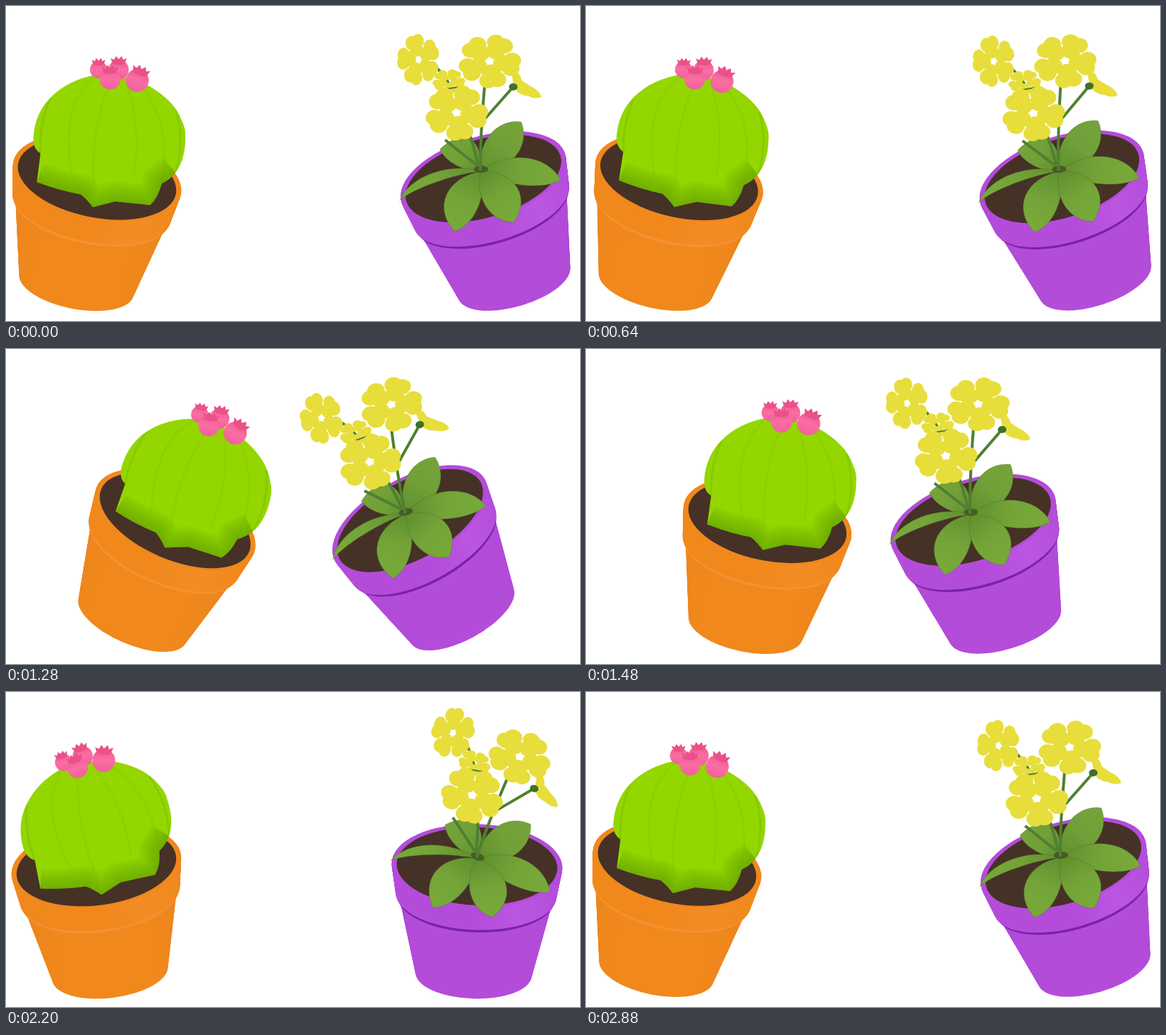
An HTML page with a canvas that plays this animation: 800x440 px, repeating every 5.76 s.

```html
<!DOCTYPE html>
<html lang="en">
<head>
<meta charset="utf-8">
<title>Two potted plants</title>
<style>
html, body { margin: 0; width: 100%; height: 100%; overflow: hidden; background: #fff; }
canvas { display: block; }
</style>
</head>
<body>
<canvas id="stage" width="800" height="440"></canvas>
<script>
const ctx = document.getElementById('stage').getContext('2d');
const LOOP = 5760, STEP = 40;
const HIT = 1400, REACH = 172, LEAN_IN = 16, LEAN_BACK = 22;
const YELLOW = '#e7de3c', STEM = '#4f8030';
const RAD = Math.PI / 180;

function blend(g, colors) {
  colors.forEach((c, i) => g.addColorStop(i / (colors.length - 1), c));
  return g;
}
const linear = (x0, y0, x1, y1, ...colors) => blend(ctx.createLinearGradient(x0, y0, x1, y1), colors);

function oval(x, y, rx, ry, color) {
  ctx.beginPath();
  ctx.ellipse(x, y, rx, ry, 0, 0, 7);
  if (color) ctx.fillStyle = color;
  ctx.fill();
}

function fill(path, color) {
  ctx.fillStyle = color;
  ctx.fill(new Path2D(path));
}

function line(path, color, width) {
  ctx.strokeStyle = color;
  ctx.lineWidth = width;
  ctx.stroke(new Path2D(path));
}

// Draws fn with its own origin, turn and scale.
function at(x, y, turn, scale, fn) {
  ctx.save();
  ctx.translate(x, y);
  ctx.rotate(turn);
  ctx.scale(scale, scale);
  fn();
  ctx.restore();
}

// Fills the solid between two ovals given as [y, rx, ry].
function sweep(a, b, color) {
  ctx.fillStyle = color;
  for (let i = 0; i <= 50; i++) {
    const [y, rx, ry] = a.map((v, k) => v + (b[k] - v) * i / 50);
    oval(0, y, rx, ry);
  }
}

function pot(edge, main, light, seam) {
  sweep([38, 108, 48], [149, 81, 34], linear(-108, 0, 108, 0, edge, main, main, main, main, edge));
  oval(0, 41.5, 110, 49, seam);
  sweep([-2, 119, 57], [38, 112, 49], linear(-119, 0, 119, 0, main, main, main, light, main));
  oval(0, -3, 119, 58, main);
  oval(0, -2, 112, 54.5, '#463127');
}

function cactus() {
  const hem = '217 248Q212 268 201 278L152 273L121 281Q113 270 104 263Q75 258 43 246';
  const body = 'M43 246L48 206Q38 200 38 185Q40 150 62 128Q85 104 125 96Q165 94 198 111Q235 132 245 160' +
    'Q251 172 250 184Q250 215 236 233Q228 243 ' + hem + 'Z';
  fill(body, '#93d600');
  ctx.save();
  ctx.clip(new Path2D(body));
  line('M48 206Q46 165 62 128M236 233Q250 190 236 145', 'rgba(105,165,0,.25)', 3);
  line('M122 100Q75 140 92 236M146 104Q118 170 122 250M166 105Q190 165 178 240M185 108Q232 160 217 246',
    'rgba(105,165,0,.16)', 2);
  for (let w = 6; w < 56; w += 7) line('M236 233L' + hem, 'rgba(80,140,0,.085)', w);
  ctx.restore();
}

function fruit(x, y, r, turn) {
  at(x, y, turn, r, () => {
    oval(0, 0, 1, 1, linear(0, -1, 0, 1, '#ee5a90', '#fa6ea3', '#f0609a'));
    fill('M-.6 -.6L-.8 -1.15L-.45 -1L-.25 -1.35L0 -1.05L.3 -1.35L.45 -1L.8 -1.15L.6 -.6Q0 -.35 -.6 -.6Z', '#ea5089');
  });
}

// A leaf from the crown to its tip, with a bulge on each side.
function leaf(x, y, left, right, color) {
  const dx = x - 662, dy = y - 231, n = Math.hypot(dx, dy);
  const blade = `M0 0C${0.3 * n} ${-left} ${0.8 * n} ${-left} ${n} 0C${0.8 * n} ${right} ${0.3 * n} ${right} 0 0Z`;
  at(662, 231, Math.atan2(dy, dx), 1, () => {
    fill(blade, linear(0, 0, n, 0, '#5f8f2e', ...color));
    line(blade, 'rgba(60,100,25,.3)', 1);
  });
}

function leaves() {
  const back = ['#719f38', '#76a43b'], front = ['#74a438', '#78aa3a'];
  leaf(605, 200, 12, 43, back);
  leaf(718, 162, 30, 32, back);
  leaf(549, 271, -9, 27, front);
  leaf(773, 243, 34, 17, front);
  leaf(625, 315, 22, 41, front);
  leaf(708, 302, 40, 28, front);
  oval(662, 228, 10, 5, '#4a5a28');
}

// Five heart-shaped petals.
function flower(x, y, rx, ry, turn) {
  ctx.fillStyle = YELLOW;
  const dot = (a, d, r) => oval(x + rx * d * Math.cos(a), y + ry * d * Math.sin(a), rx * r, ry * r);
  for (let i = 0; i < 5; i++) {
    const a = turn + i * Math.PI * 0.4;
    dot(a - 0.21, 0.72, 0.28);
    dot(a + 0.21, 0.72, 0.28);
    dot(a, 0.42, 0.3);
  }
}

function flowers() {
  line('M599 85Q616 102 621 117M612 187L657 223M643 170Q652 195 658 222M667 112Q661 180 661 230M706 114L668 157', STEM, 4);
  flower(617, 105, 23, 17, 0.2);
  line('M613 116L632 113', STEM, 2);
  fill('M704 92Q716 90 719 104L731 112Q744 118 746 127Q738 131 728 126Q712 124 708 112Z', YELLOW);
  oval(707, 113, 6, 5, '#41702a');
  flower(575, 75, 30, 36, -1.83);
  flower(674, 77, 44, 38, 0.17);
  flower(628, 149, 44, 39, 0.17);
}

// Way travelled towards the middle, and lean towards it in degrees.
function pose(t) {
  const near = Math.max(0, 1 - Math.abs(t / HIT - 1));
  const shift = REACH * near ** 5.3;
  if (t < HIT) return [shift, LEAN_IN * near ** 3];
  if (t < 1750) return [shift, (LEAN_IN + LEAN_BACK) * (1 - (t - HIT) / 350) ** 2 - LEAN_BACK];
  const u = Math.min(1, Math.max(0, (t - 1950) / 930));
  return [shift, -LEAN_BACK * (1 + Math.cos(Math.PI * u)) / 2];
}

// side is 1 for the left plant and -1 for the right; the rim's middle is the pivot.
function plant(x, y, side, roll, rest, colors, grow, [shift, lean]) {
  at(x + side * shift + roll * lean, y - 0.13 * lean, side * lean * RAD, 1, () => {
    at(0, 0, rest * RAD, 1, () => pot(...colors));
    ctx.translate(-x, -y);
    grow();
  });
}

function growCactus() {
  cactus();
  fruit(157, 89, 14, 0);
  fruit(129, 89, 12, 0);
  fruit(145, 102, 14.5, 0);
  fruit(183, 104, 16, 0.35);
}

function growFlowers() {
  leaves();
  flowers();
}

function draw(t) {
  const p = pose(t);
  ctx.clearRect(0, 0, 800, 440);
  plant(126.5, 243, 1, 0.12, 11, ['#ec851c', '#f0881c', '#f28d25', '#f39232'], growCactus, p);
  plant(666, 243, -1, 0.42, -16.5, ['#b04ad8', '#b44cda', '#bb56e2', '#7a22a6'], growFlowers, p);
}

let start;
function tick(now) {
  start ??= now;
  const t = (now - start) % LOOP;
  draw(Math.floor(t / STEP) * STEP);
  requestAnimationFrame(tick);
}
draw(0);
requestAnimationFrame(tick);
</script>
</body>
</html>
```
